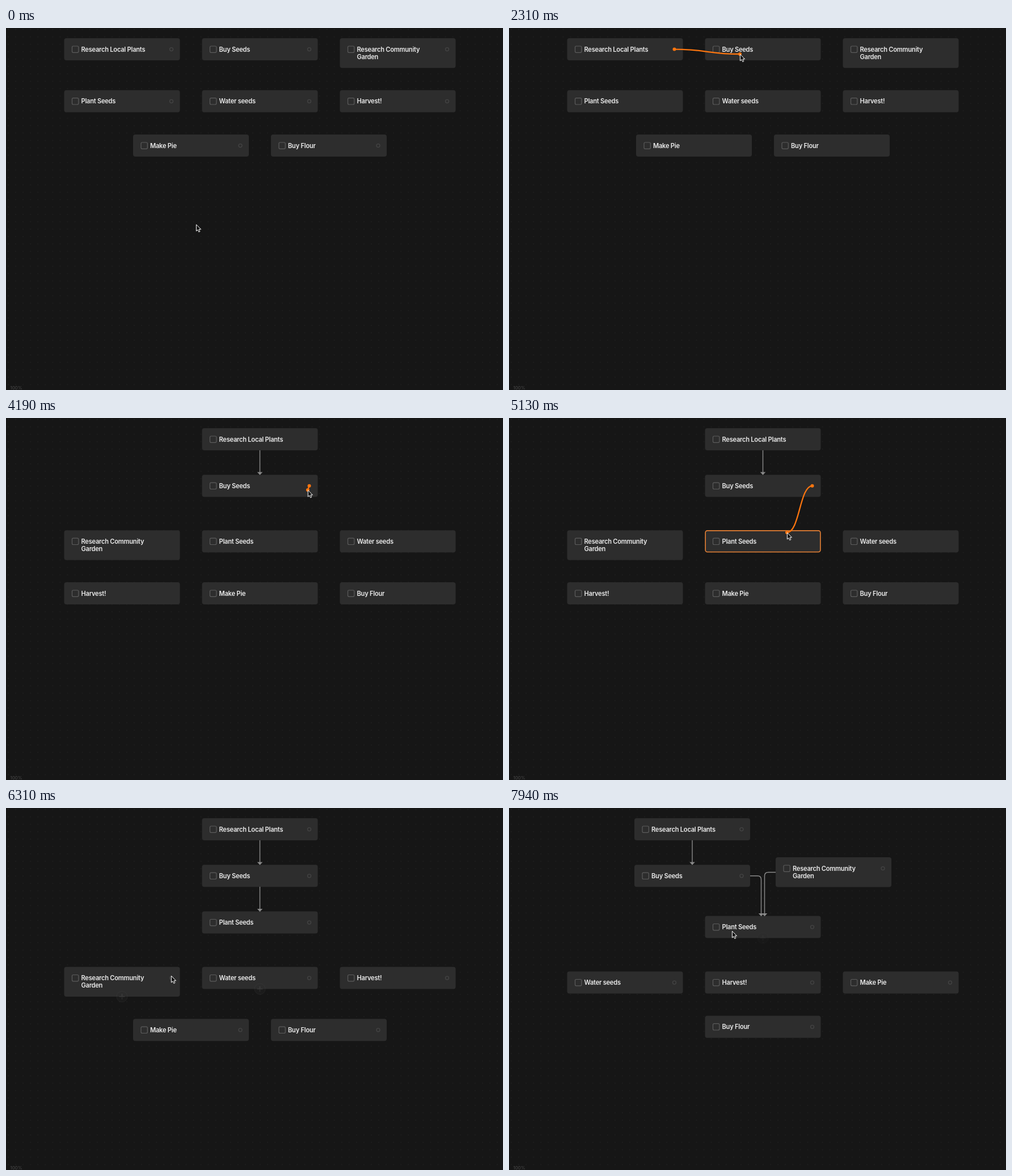
Recreate the animation shown at these times as an HTML page. Size 876 by 639 pixels, loop 8 s.

```html
<!DOCTYPE html>
<html lang="en">
<head>
<meta charset="utf-8">
<title>Task flow</title>
<style>
html, body { margin: 0; width: 100%; height: 100%; overflow: hidden; background: #161616; }
svg { display: block; width: 876px; height: 639px; }
text { font: 600 11.1px Inter, Roboto, sans-serif; letter-spacing: -.24px; fill: #ececec; }
.zoom { font-size: 8px; font-weight: 400; letter-spacing: 0; fill: #4a4a4a; }
.card { fill: #2d2d2d; }
.box { fill: none; stroke: #5c5c5c; stroke-width: 1.2; }
.ring { fill: none; stroke: #444; stroke-width: 1.3; }
.outline { fill: none; stroke: #e57f33; stroke-width: 1.6; }
.link { fill: none; stroke: #8a8a8a; stroke-width: 1.4; }
.head { fill: #8a8a8a; }
.plus circle { fill: #2b2b2b; stroke: #4a4a4a; }
.plus path { stroke: #646464; stroke-width: 1.8; }
.wire { fill: none; stroke: #fb750f; stroke-width: 2.3; }
.dot { fill: #fb750f; }
.cursor { fill: #111; stroke: #fff; stroke-width: 1; stroke-linejoin: round; }
</style>
</head>
<body>
<svg viewBox="0 0 876 639">
  <defs>
    <pattern id="dots" x="-2.5" y="-4" width="13.06" height="13.06" patternUnits="userSpaceOnUse">
      <circle cx="6.5" cy="6.5" r=".75" fill="#272727"/>
    </pattern>
  </defs>
  <rect width="876" height="639" fill="#161616"/>
  <rect width="876" height="639" fill="url(#dots)"/>
  <text class="zoom" x="7.5" y="638">100%</text>
  <g id="scene"></g>
</svg>
<script>
const LOOP = 8000, CARD_W = 204;
const scene = document.getElementById('scene');

const col = k => 102.5 + 121.5 * k;
const card = (title, x, y) => {
  const lines = title.split('|');
  return { lines, x, y, h: lines.length > 1 ? 52.5 : 39 };
};
const LOCAL = 'Research Local Plants', GARDEN = 'Research Community|Garden';

// Each layout holds from its start time until the next one.
const layouts = [
  { start: 0, links: [], cards: [
    card(LOCAL, col(0), 18), card('Buy Seeds', col(2), 18), card(GARDEN, col(4), 18),
    card('Plant Seeds', col(0), 109.7), card('Water seeds', col(2), 109.7), card('Harvest!', col(4), 109.7),
    card('Make Pie', col(1), 188), card('Buy Flour', col(3), 188)] },
  { start: 2380, links: ['M447.5 57V100'], cards: [
    card(LOCAL, col(2), 18), card('Buy Seeds', col(2), 100.2),
    card(GARDEN, col(0), 198.2), card('Plant Seeds', col(2), 198.2), card('Water seeds', col(4), 198.2),
    card('Harvest!', col(0), 290), card('Make Pie', col(2), 290), card('Buy Flour', col(4), 290)] },
  { start: 5630, links: ['M447.5 57V100', 'M447.5 139V182.5'], cards: [
    card(LOCAL, col(2), 18), card('Buy Seeds', col(2), 100.2), card('Plant Seeds', col(2), 182.5),
    card(GARDEN, col(0), 280.5), card('Water seeds', col(2), 280.5), card('Harvest!', col(4), 280.5),
    card('Make Pie', col(1), 372.2), card('Buy Flour', col(3), 372.2)] },
  { start: 7780,
    links: ['M323 57V100', 'M425 119.7H438Q444.5 119.7 444.5 126.2V190.5', 'M470 113.5H457Q450.5 113.5 450.5 120V190.5'],
    cards: [
      card(LOCAL, 221, 18), card('Buy Seeds', 221, 100.2), card(GARDEN, 470, 87), card('Plant Seeds', col(2), 190.5),
      card('Water seeds', col(0), 288.5), card('Harvest!', col(2), 288.5), card('Make Pie', col(4), 288.5),
      card('Buy Flour', col(2), 366.7)] }
];

// Wire drags: index of the starting card, and when the drop outline goes off
const drags = [
  { start: 1750, release: 2250, end: 2380, from: 0 },
  { start: 4000, release: 5530, end: 5630, from: 1 },
  { start: 7060, release: 7640, end: 7780, from: 3 }
];

// Pointer path: time, x, y
const path = [
  [0, 335, 346.5], [190, 335, 346.5], [780, 302, 150], [900, 298, 85], [1000, 298, 62],
  [1200, 292, 40], [1440, 291.5, 37.5], [1750, 291.5, 37.5], [2050, 350, 41], [2250, 407, 46],
  [2630, 407, 46], [2730, 410, 68], [2880, 428, 119.5], [3060, 480, 127], [3380, 534, 120],
  [4000, 534, 120], [4750, 512, 180], [5130, 490, 202], [5560, 489, 204], [5750, 475, 225],
  [6050, 346, 288], [6120, 306, 291], [6310, 291, 296], [6600, 291.5, 299], [7060, 291.5, 299],
  [7500, 375, 222], [7660, 393, 211.5], [7850, 393, 211.5], [7930, 393, 217], [8000, 393, 217]
];

const slope = (i, axis) => {
  const a = path[i - 1], p = path[i], b = path[i + 1];
  const still = (m, n) => m[1] === n[1] && m[2] === n[2];
  if (!a || !b || still(a, p) || still(p, b)) return 0;
  return (b[axis] - a[axis]) / (b[0] - a[0]);
};

function pointer(t) {
  const i = Math.max(0, path.findIndex(p => p[0] > t) - 1);
  const a = path[i], b = path[i + 1], span = b[0] - a[0], u = (t - a[0]) / span;
  const ease = u * u * (3 - 2 * u);
  const axis = k => a[k] + (b[k] - a[k]) * ease
    + span * u * (1 - u) * ((1 - u) * slope(i, k) - u * slope(i + 1, k));
  return { x: axis(1), y: axis(2) };
}

const layoutAt = t => layouts.findLast(l => l.start <= t);
const dragAt = t => drags.find(d => t >= d.start && t < d.end);
const inside = (c, p) => p.x >= c.x && p.x <= c.x + CARD_W && p.y >= c.y && p.y <= c.y + c.h;

// The add button follows hovering after a delay, with a 200 ms fade.
function plusOpacity(c, layout, t) {
  if (dragAt(t)) return 0;
  let hits = 0;
  for (let ago = 150; ago < 350; ago += 10) {
    const s = t - ago;
    if (s >= layout.start && !dragAt(s) && inside(c, pointer(s))) hits++;
  }
  return hits / 20;
}

function drawCard(c, showRing) {
  const text = c.lines.map((s, i) => `<text x="30" y="${23.6 + i * 13.3}">${s}</text>`).join('');
  return `<g transform="translate(${c.x} ${c.y})">
    <rect class="card" width="${CARD_W}" height="${c.h}" rx="4"/>
    <rect class="box" x="14" y="14" width="11.3" height="11.3" rx="2"/>${text}
    ${showRing ? '<circle class="ring" cx="189" cy="19.6" r="3"/>' : ''}</g>`;
}

function drawLink(d) {
  const [x, y] = d.match(/([\d.]+) [\d.]+V([\d.]+)/).slice(1);
  return `<path class="link" d="${d}"/><path class="head" d="M${x} ${y}m-4.8-4.5h9.6l-4.8 5z"/>`;
}

function drawPlus(c, opacity) {
  if (!opacity) return '';
  return `<g class="plus" opacity="${opacity}" transform="translate(${c.x + CARD_W / 2} ${c.y + c.h})">
    <circle r="9.5"/><path d="M-5 0H5M0-5V5"/></g>`;
}

function drawOutline(c) {
  return `<rect class="outline" x="${c.x + .7}" y="${c.y + .7}"
    width="${CARD_W - 1.4}" height="${c.h - 1.4}" rx="3.5"/>`;
}

function drawWire(c, p) {
  const x = c.x + 189, y = c.y + 19.6, mid = (x + p.x) / 2;
  return `<path class="wire" d="M${x} ${y}C${mid} ${y} ${mid} ${p.y} ${p.x} ${p.y}"/>
    <circle class="dot" cx="${x}" cy="${y}" r="3"/><circle class="dot" cx="${p.x}" cy="${p.y}" r="3"/>`;
}

function draw(t) {
  const layout = layoutAt(t), drag = dragAt(t), p = pointer(t), { cards, links } = layout;
  const parts = [
    ...cards.map(c => drawCard(c, !drag)),
    ...links.map(drawLink),
    ...cards.map(c => drawPlus(c, plusOpacity(c, layout, t)))
  ];
  if (drag) {
    const first = cards[drag.from];
    const over = t < drag.release && cards.find(c => c !== first && inside(c, p));
    if (over) parts.push(drawOutline(over));
    parts.push(drawWire(first, p));
  }
  parts.push(`<path class="cursor" transform="translate(${p.x + .4} ${p.y + .4})"
    d="M0 0V11.6L2.6 9.2 4.4 13.2 6.4 12.3 4.7 8.4H8.2Z"/>`);
  scene.innerHTML = parts.join('');
}

const begin = performance.now();
function tick() {
  draw((performance.now() - begin) % LOOP);
  requestAnimationFrame(tick);
}
tick();
</script>
</body>
</html>
```
